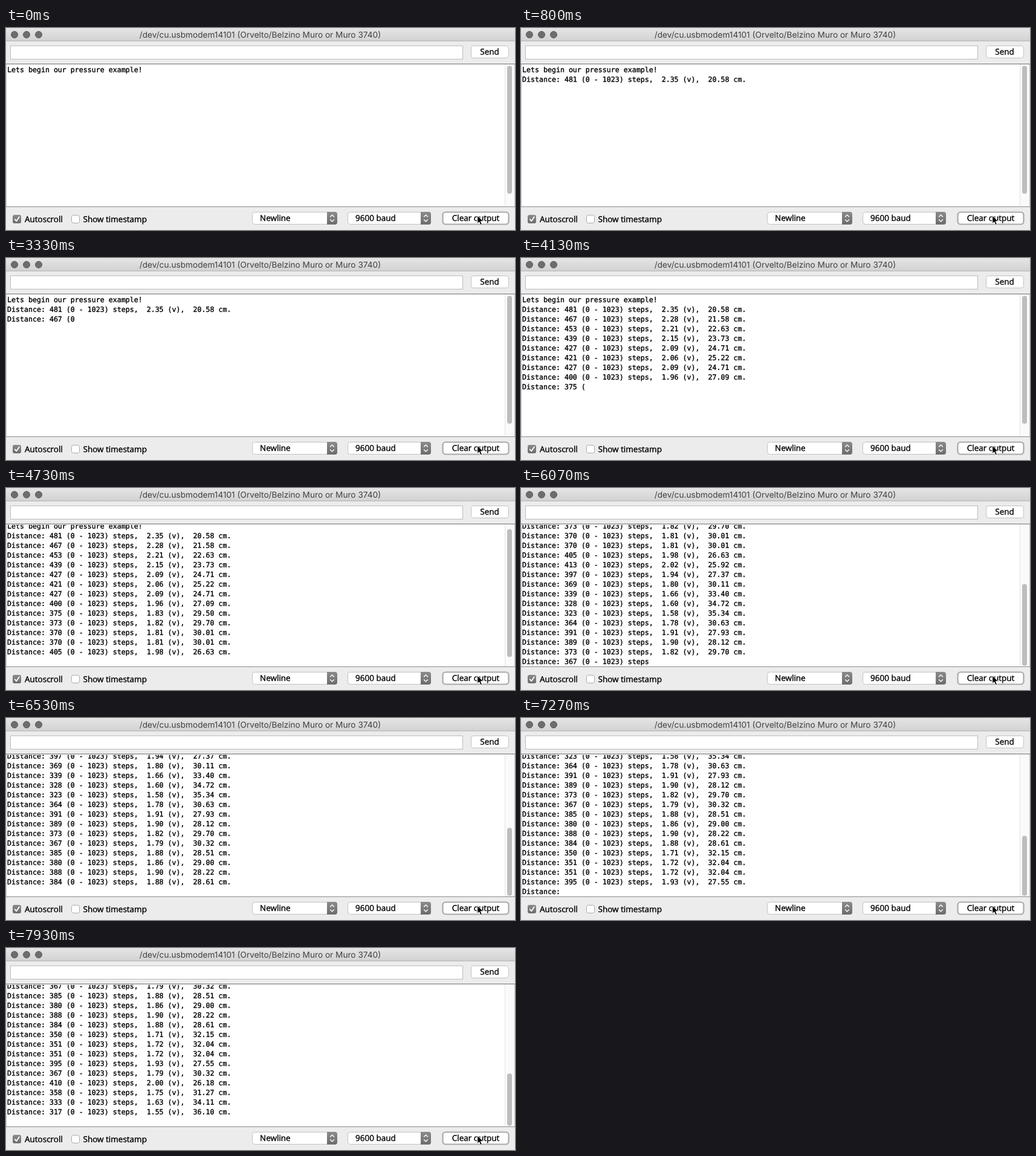
Write an HTML page that moves like this. It is 842 px wide and 334 px high and loops after 8000 ms.

```html
<!DOCTYPE html>
<html lang="en">
<head>
<meta charset="utf-8">
<title>Serial monitor</title>
<style>
  html, body { margin: 0; width: 100%; height: 100%; overflow: hidden; background: #ececec; }
  svg { display: block; width: 842px; height: 334px; }
  text { white-space: pre; text-rendering: geometricPrecision; }
  .title { font: 13.65px Inter, sans-serif; fill: #404040; text-anchor: middle; }
  .ui { font: 13.5px "Open Sans", "Noto Sans", sans-serif; fill: #000; stroke: #000; stroke-width: .4px; }
  .mid { text-anchor: middle; }
  .log { font: 11.628px "DejaVu Sans Mono", monospace; fill: #000; stroke: #000; stroke-width: .35px; }
</style>
</head>
<body>
<svg viewBox="0 0 842 334" xmlns="http://www.w3.org/2000/svg">
  <defs>
    <linearGradient id="bar" x2="0" y2="1">
      <stop stop-color="#e5e5e5"/><stop offset="1" stop-color="#d1d1d1"/>
    </linearGradient>
    <linearGradient id="cap" x2="0" y2="1">
      <stop stop-color="#8b8b8b"/><stop offset="1" stop-color="#6c6c6c"/>
    </linearGradient>
    <clipPath id="view"><rect x="1" y="61" width="824" height="234"/></clipPath>
    <g id="select">
      <path d="M0 0 H13 a4 4 0 0 1 4 4 V17 a4 4 0 0 1 -4 4 H0 Z" fill="url(#cap)"/>
      <path d="M5.5 8 L8.5 5 L11.5 8 M5.5 13 L8.5 16 L11.5 13" fill="none" stroke="#fff" stroke-width="1.4" stroke-linecap="round" stroke-linejoin="round"/>
    </g>
  </defs>

  <rect width="842" height="334" fill="#ececec"/>
  <rect width="842" height="22" fill="url(#bar)"/>
  <rect y="21" width="842" height="1" fill="#b5b5b5"/>
  <g fill="#6d6d6d" stroke="#5c5c5c">
    <circle cx="14" cy="11" r="5.5"/><circle cx="34" cy="11" r="5.5"/><circle cx="54" cy="11" r="5.5"/>
  </g>
  <text class="title" x="420.5" y="16">/dev/cu.usbmodem14101 (Orvelto/Belzino Muro or Muro 3740)</text>

  <rect x="7.5" y="29.5" width="748" height="22" fill="#fff" stroke="#bcbcbc"/>
  <rect x="769.5" y="29.5" width="62" height="20" rx="4" fill="#fff" stroke="#c2c2c2"/>
  <text class="ui mid" x="800" y="44">Send</text>

  <rect y="59" width="842" height="237" fill="#fff"/>
  <rect x="826" y="60" width="15" height="235" fill="#fafafa"/>
  <rect x="825" y="60" width="1" height="235" fill="#e5e5e5"/>
  <path d="M0 59.5 H842" stroke="#727272"/>
  <path d="M0 295.5 H842" stroke="#8c8c8c"/>
  <path d="M.5 60 V295 M841.5 60 V295" stroke="#c6c6c6"/>
  <rect id="thumb" x="829" width="8" rx="4" fill="#bdbdbd"/>
  <g clip-path="url(#view)"><g id="log" class="log"></g></g>

  <rect x="11" y="309" width="14" height="14" rx="3" fill="url(#cap)"/>
  <path d="M14.7 316.4 L17.3 319.3 L21.8 312.4" fill="none" stroke="#fff" stroke-width="1.8" stroke-linecap="round" stroke-linejoin="round"/>
  <text class="ui" x="31" y="321">Autoscroll</text>
  <rect x="108.5" y="309.5" width="13" height="13" rx="3" fill="#fff" stroke="#a9a9a9"/>
  <text class="ui" x="127.5" y="321">Show timestamp</text>

  <rect x="407.5" y="304.5" width="140" height="20" rx="4" fill="#fff" stroke="#c2c2c2"/>
  <use href="#select" x="531" y="304"/>
  <text class="ui" x="420" y="319">Newline</text>

  <rect x="565.5" y="304.5" width="137" height="20" rx="4" fill="#fff" stroke="#c2c2c2"/>
  <use href="#select" x="686" y="304"/>
  <text class="ui" x="578" y="319">9600 baud</text>

  <rect x="722.5" y="304.5" width="109" height="20" rx="4.5" fill="#fff" stroke="#a9a9a9" stroke-width="2.2"/>
  <text class="ui mid" x="777" y="319">Clear output</text>
  <path d="M779.8 310 V323.5 L782.8 320.7 L785.1 325.8 L787.5 324.7 L785.3 319.8 H789.5 Z" fill="#000" stroke="#fff" stroke-linejoin="round"/>
</svg>
<script>
const LOOP = 8000, FPS = 15;
const ROW = 16, VIEW = 234, TRACK = 232, MIN_HEIGHT = 256;
const LINES = 37;

// Timing in ticks of 1/15 s: lines come at a steady pace, with a pause after some
const PERIOD = 1.48, TYPING = 0.7, PAUSE = 1.65;
const FIRST = 10.5, SECOND = 49.788;
const pauseAfter = [5, 12, 13, 14, 17, 28, 29, 30, 33, 36];

// Sensor value at every third line; the lines between scatter around the trend
const GAP = 3, SCATTER = 25;
const trend = [481, 439, 427, 373, 405, 369, 323, 389, 385, 384, 351, 410, 317];

function seeded(seed) {
  return () => (seed = seed * 16807 % 2147483647) / 2147483647;
}
const random = seeded(2024);

function startOf(line) {
  if (line === 1) return FIRST;
  const pauses = pauseAfter.filter(p => p < line).length;
  return SECOND + (line - 2) * PERIOD + pauses * PAUSE;
}

function sensor(i) {
  const k = Math.floor(i / GAP), f = i % GAP / GAP;
  if (!f) return trend[k];
  const mean = trend[k] + (trend[k + 1] - trend[k]) * f;
  const spread = k ? SCATTER : 0;
  return Math.round(mean + (random() * 2 - 1) * spread);
}

const volts = s => s * 5 / 1023;
const distance = s => 104.62 * Math.exp(-0.0033804 * s) + 0.273 * Math.exp(-0.0292 * (s - 317));

function reading(i) {
  const s = sensor(i);
  return `Distance: ${s} (0 - 1023) steps,  ${volts(s).toFixed(2)} (v),  ${distance(s).toFixed(2)} cm.`;
}

const log = document.getElementById("log");
const thumb = document.getElementById("thumb");

function addRow(i, str) {
  const row = document.createElementNS("http://www.w3.org/2000/svg", "text");
  row.setAttribute("x", 2);
  row.setAttribute("y", 73 + ROW * i);
  row.textContent = str;
  return log.appendChild(row);
}

addRow(0, "Lets begin our pressure example!");
const lines = Array.from({ length: LINES }, (_, i) => ({
  str: reading(i), start: startOf(i + 1), row: addRow(i + 1, "")
}));

function draw(ms) {
  const tick = Math.floor((ms + 4) * FPS / 1000);
  let current = 1;
  for (const { str, start, row } of lines) {
    const part = Math.min(1, Math.max(0, (tick - start) / TYPING));
    row.textContent = str.slice(0, Math.floor(part * str.length));
    if (part === 1) current++;
  }
  const used = ROW * (current + 1);
  const height = Math.max(MIN_HEIGHT, used);
  const scroll = Math.max(0, used - VIEW);
  log.setAttribute("transform", `translate(0 ${-scroll})`);
  thumb.setAttribute("y", 62.5 + scroll / height * TRACK);
  thumb.setAttribute("height", VIEW / height * TRACK - 0.5);
}

const begin = performance.now();
function loop() {
  draw((performance.now() - begin) % LOOP);
  requestAnimationFrame(loop);
}
draw(0);
requestAnimationFrame(loop);
</script>
</body>
</html>
```
